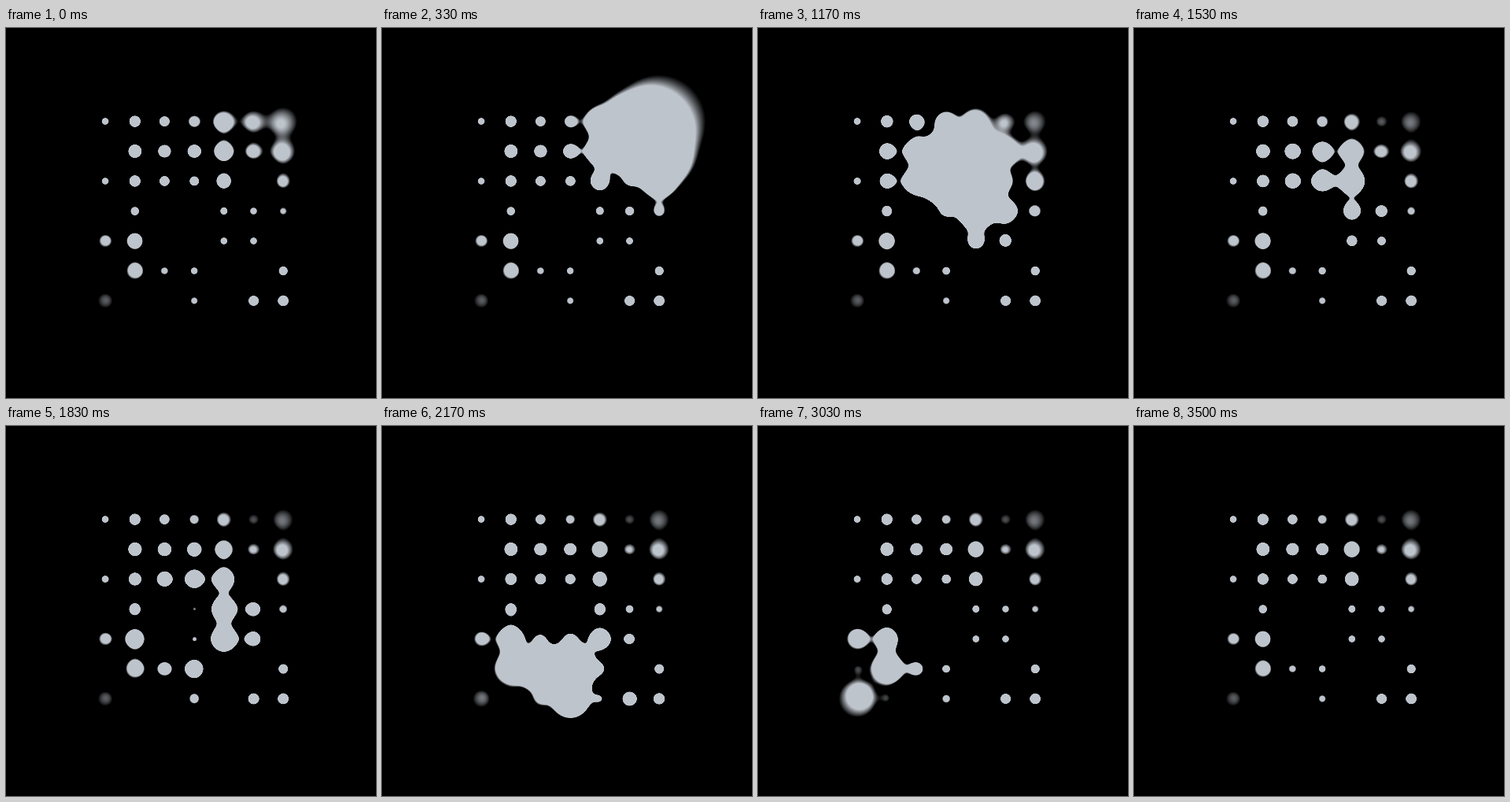
An HTML page with a canvas that plays this animation: 470x470 px, repeating every 3.53 s.

```html
<!DOCTYPE html>
<html lang="en">
<head>
<meta charset="utf-8">
<title>Gooey dots</title>
<style>
  html, body { margin: 0; width: 100%; height: 100%; overflow: hidden; background: #000; }
  canvas { display: block; }
</style>
</head>
<body>
<canvas id="stage" width="470" height="470"></canvas>
<script>
const SIZE = 470, GRID = 7, LOOP = 3530, REACH = 43;
const ctx = document.getElementById('stage').getContext('2d');
const image = ctx.createImageData(SIZE, SIZE);
const field = new Float32Array(SIZE * SIZE);
const softness = new Float32Array(SIZE * SIZE);
const wave = new Float32Array(SIZE);

// Places in the grid (column, row) where dots are larger, and by how much.
const swells = [[6, 0.6, 8], [3.8, 1, 5.6], [1.4, 1, 4], [0.7, 4.7, 6], [0, 6.3, 3.5], [5.6, 6.2, 2.5]];
// Gaps in the grid; the first column also skips every other dot.
const gaps = [[2.5, 3.5], [4.3, 5.3], [1.5, 6], [5, 2], [6, 4]];

function restRadius(col, row) {
  const isGap = gaps.some(([x, y]) => Math.hypot(col - x, row - y) < 0.8);
  if (isGap || (col === 0 && row % 2)) return -12;
  return swells.reduce((r, [x, y, size]) =>
    r + size * Math.exp(-((1.15 * (col - x) ** 2 + 0.45 * (row - y) ** 2) ** 2)), 4.6);
}

const dots = Array.from({ length: GRID * GRID }, (_, n) => {
  const col = n % GRID, row = Math.floor(n / GRID);
  return { x: 125.5 + 37.7 * col, y: 118 + 38 * row, r: restRadius(col, row) };
});

// The wandering pulse: time, x, y, growth.
const path = [
  [0, 318, 95, 8],
  [300, 352, 118, 46],
  [630, 328, 197, 36],
  [1170, 265, 190, 31],
  [1550, 260, 205, 8],
  [2170, 225, 312, 29],
  [2800, 145, 318, 35],
  [3200, 126, 342, 0],
  [LOOP, 126, 342, 0]
];

// Edges blur towards the top right and bottom left corners.
for (let i = 0; i < field.length; i++) {
  const offAxis = Math.abs(i % SIZE - Math.floor(i / SIZE));
  softness[i] = 0.03 + (offAxis / 234) ** 4.5;
  image.data.set([190, 196, 204], i * 4);
}

// Smooth curve through the path points.
function pulseAt(t) {
  const i = path.findIndex(p => p[0] > t);
  const a = path[i - 1], b = path[i];
  const before = path[i - 2] || a, after = path[i + 1] || b;
  const span = b[0] - a[0], u = (t - a[0]) / span;
  return [1, 2, 3].map(k => {
    const m0 = (b[k] - before[k]) / (b[0] - before[0]) * span;
    const m1 = (after[k] - a[k]) / (after[0] - a[0]) * span;
    const rise = b[k] - a[k];
    return a[k] + u * (m0 + u * (3 * rise - 2 * m0 - m1 + u * (m0 + m1 - 2 * rise)));
  });
}

const clip = v => Math.max(0, Math.min(SIZE, Math.round(v)));

// Adds a bell that reaches 1 at distance r.
function addDot(x, y, r) {
  const spread = 140 * (1 + Math.max(0, r) / 15);
  const power = r * Math.abs(r);
  const extent = Math.sqrt(Math.max(0, power + 5 * spread));
  const left = clip(x - extent), right = clip(x + extent);
  const top = clip(y - extent), bottom = clip(y + extent);
  for (let px = left; px < right; px++) wave[px] = Math.exp(-((px - x) ** 2) / spread);
  for (let py = top; py < bottom; py++) {
    const gain = Math.exp((power - (py - y) ** 2) / spread);
    for (let px = left; px < right; px++) field[py * SIZE + px] += gain * wave[px];
  }
}

function draw() {
  const [cx, cy, growth] = pulseAt(performance.now() % LOOP);
  field.fill(0);
  for (const { x, y, r } of dots) {
    const near = Math.exp(-((x - cx) ** 2 + (y - cy) ** 2) / (2 * REACH * REACH));
    addDot(x, y, r + Math.max(0, growth) * near);
  }
  for (let i = 0; i < field.length; i++) {
    image.data[i * 4 + 3] = field[i] > 1 ? 255 * Math.log(field[i]) / softness[i] : 0;
  }
  ctx.putImageData(image, 0, 0);
  requestAnimationFrame(draw);
}
draw();
</script>
</body>
</html>
```
